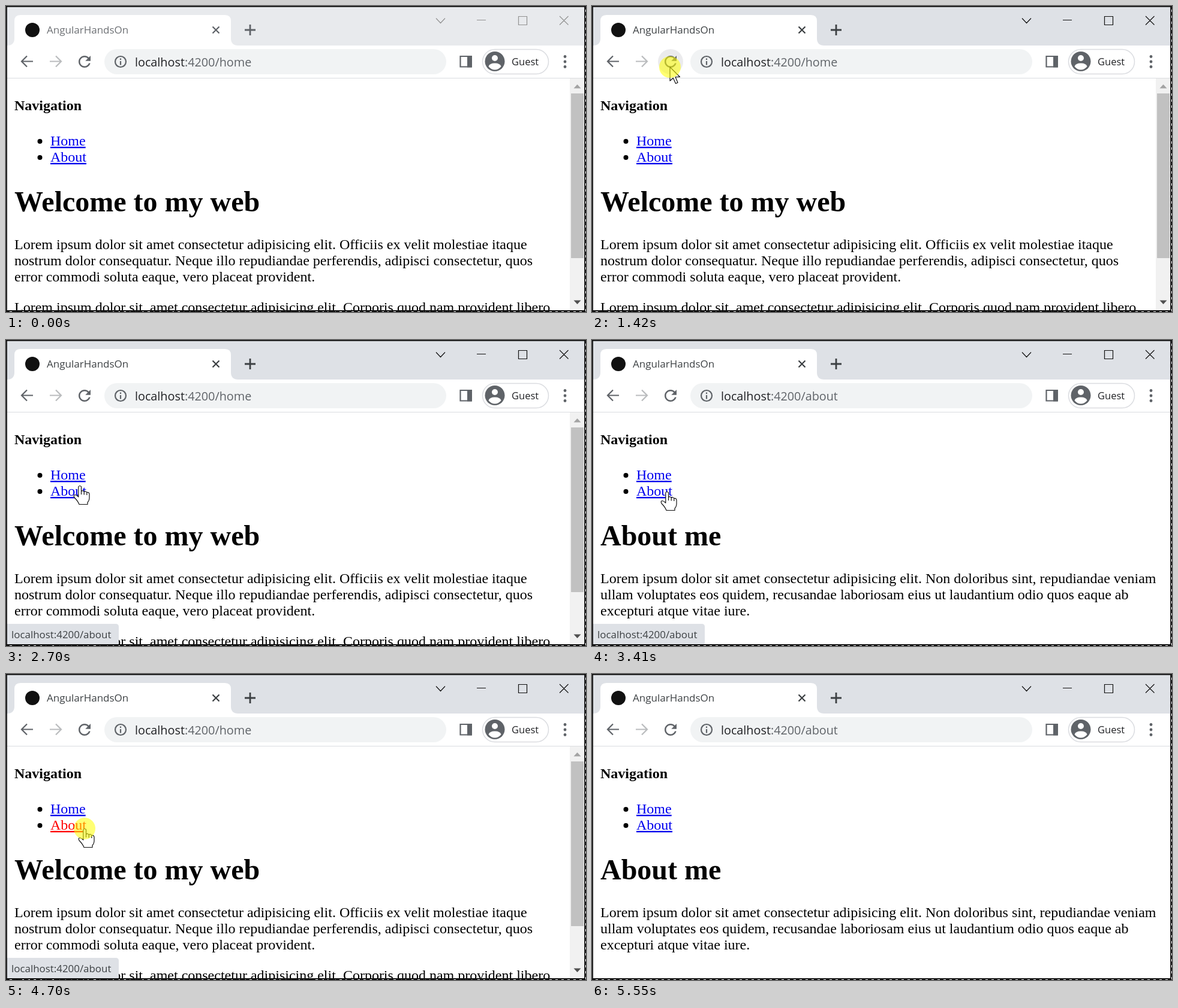
An HTML page for the animation above (5.84 s loop, 967 px wide and 511 px high).

```html
<!DOCTYPE html>
<html lang="en">
<head>
<meta charset="utf-8">
<title>Router navigation</title>
<style>
  html, body { margin: 0; width: 100%; height: 100%; overflow: hidden; background: #fff; }
  svg { display: block; width: 967px; height: 511px; }
  text { white-space: pre; }
  .ui { font-family: "Open Sans", "Noto Sans", sans-serif; fill: #3c4043; }
  .page { font: 24px "Liberation Serif", "Times New Roman", serif; fill: #000; }
  .bold { font-weight: bold; }
  .title { font-weight: bold; font-size: 48px; }
  .link { fill: #0000ee; text-decoration: underline; }
  .line { fill: none; stroke: #5f6368; stroke-width: 2.2; }
  .solid { fill: #5f6368; }
  #strip { fill: #dee1e6; }
  #controls { fill: none; stroke: #111; stroke-width: 1.2; }
  #tabMarks { fill: none; stroke: #3c4043; }
  .inactive #strip { fill: #e8eaed; }
  .inactive #controls { stroke: #929292; }
  .inactive #tabTitle { fill: #6c6f73; }
  .inactive #tabMarks { stroke: #5f6368; }
  #arrow, #hand { fill: #fff; stroke: #111; stroke-width: 1.2; stroke-linejoin: round; }
</style>
</head>
<body>
<svg id="stage" viewBox="0 0 967 511" class="inactive">
  <rect width="967" height="511" fill="#fff"/>

  <!-- tab strip -->
  <rect id="strip" width="967" height="66"/>
  <path d="M2 66Q14 66 14 54V25Q14 15 24 15H365Q375 15 375 25V54Q375 66 387 66Z" fill="#fff"/>
  <circle id="favicon" cx="44" cy="40" r="12" fill="#111"/>
  <text id="tabTitle" class="ui" x="68" y="46" font-size="17">AngularHandsOn</text>
  <g id="tabMarks">
    <path d="M344.5 34.5l11 11m0-11l-11 11" stroke-width="2.2"/>
    <path d="M398 40h18m-9-9v18" stroke-width="2.8"/>
  </g>
  <path id="controls" d="M717 20.5l7.500 8 7.500-8M785 23.500h15M854.500 17.500h14v14h-14zM923 17l14.500 14.500m0-14.500l-14.500 14.500"/>

  <!-- toolbar -->
  <path class="line" d="M45 92.500H26m9-9l-9 9 9 9"/>
  <path class="line" d="M73 92.500H92m-9-9l9 9-9 9" style="stroke:#babcbe"/>
  <circle id="hover" cx="131" cy="93" r="21" fill="#e9e9eb"/>
  <path class="solid" transform="translate(116 78) scale(1.25)" d="M17.650 6.350C16.200 4.900 14.210 4 12 4c-4.420 0-8 3.580-8 8s3.580 8 8 8c3.730 0 6.840-2.550 7.730-6h-2.080c-.82 2.330-3.040 4-5.650 4-3.310 0-6-2.690-6-6s2.690-6 6-6c1.660 0 3.140.69 4.220 1.780L13 11h7V4z"/>
  <rect x="164" y="72" width="570" height="42" rx="21" fill="#f1f3f4"/>
  <circle class="line" cx="191" cy="93" r="9"/>
  <path class="line" d="M191 92v6.500M191 87.500v2.500"/>
  <text class="ui" x="215" y="101" font-size="19.8" style="fill:#202124">localhost<tspan id="url" fill="#5f6368"></tspan></text>
  <path class="line" d="M757.500 84h18v17.500h-18z"/>
  <path class="solid" d="M769 83h8v19.500h-8z"/>
  <rect x="794.500" y="72.500" width="110" height="41" rx="20.500" fill="#fff" stroke="#dadce0" stroke-width="1.500"/>
  <circle class="solid" cx="815" cy="92.500" r="16.500"/>
  <circle cx="815" cy="87" r="5" fill="#fff"/>
  <path d="M804.500 101Q806 95.500 815 95.500T825.500 101Q821 106.500 815 106.500T804.500 101Z" fill="#fff"/>
  <text class="ui" x="843" y="98.500" font-size="16.5" style="fill:#202124">Guest</text>
  <g class="solid">
    <circle cx="932" cy="84.500" r="2.400"/><circle cx="932" cy="93" r="2.400"/><circle cx="932" cy="101.500" r="2.400"/>
  </g>
  <path d="M2 120.500H965" stroke="#dadce0"/>

  <!-- page -->
  <g class="page">
    <text class="bold" x="14" y="174">Navigation</text>
    <circle cx="56.500" cy="226" r="4"/>
    <circle cx="56.500" cy="253" r="4"/>
    <text id="homeLink" class="link" x="74" y="233">Home</text>
    <text id="aboutLink" class="link" x="74" y="260">About</text>
    <g id="homePage">
      <text class="title" x="14" y="343">Welcome to my web</text>
      <text x="14" y="406">Lorem ipsum dolor sit amet consectetur adipisicing elit. Officiis ex velit molestiae itaque</text>
      <text x="14" y="433">nostrum dolor consequatur. Neque illo repudiandae perferendis, adipisci consectetur, quos</text>
      <text x="14" y="460">error commodi soluta eaque, vero placeat provident.</text>
      <text x="14" y="511">Lorem ipsum dolor sit, amet consectetur adipisicing elit. Corporis quod nam provident libero</text>
      <path d="M940 121h24v388h-24z" fill="#f1f1f1"/>
      <path d="M942 146h21v275h-21z" fill="#c1c1c1"/>
      <path d="M946.500 137.500l6-6.500 6 6.500z" fill="#a3a3a3"/>
      <path d="M946.500 491.500l6 6.500 6-6.500z" fill="#505050"/>
    </g>
    <g id="aboutPage">
      <text class="title" x="14" y="343">About me</text>
      <text x="14" y="406">Lorem ipsum dolor sit amet consectetur adipisicing elit. Non doloribus sint, repudiandae veniam</text>
      <text x="14" y="433">ullam voluptates eos quidem, recusandae laboriosam eius ut laudantium odio quos eaque ab</text>
      <text x="14" y="460">excepturi atque vitae iure.</text>
    </g>
  </g>

  <g id="status">
    <path d="M1 474H183Q188 474 188 479V509H1Z" fill="#dee1e6"/>
    <text id="statusText" class="ui" x="9" y="498" font-size="16.9"></text>
  </g>

  <!-- window frame -->
  <path d="M0 .75H966M1 0V510M965 0V510M0 509H966" fill="none" stroke="#111" stroke-width="1.800"/>
  <path d="M966.500 0V511M0 510.500H967" fill="none" stroke="#111" stroke-dasharray="6 4"/>

  <g id="pointer">
    <path id="arrow" d="M0 0V23L5.300 18.200 9.500 27.500 13 26 9 16.500H16.500Z"/>
    <path id="hand" d="M-2.200 2Q0-1 2.500 2V9.500Q5.500 7.500 7.200 10.500 10 8.500 11.800 11.500 15.500 10.500 16 14.500V21Q15.500 26 13 28V31.500H-1Q-3 26-9 20-11 16-8 15.500-6 15.500-2.200 19ZM2.500 9.500V15M7.200 10.500V15.500M11.800 11.500V16"/>
    <circle id="press" r="18" fill="#ff0" fill-opacity=".55"/>
  </g>
</svg>

<script>
const LOOP = 5840;
const $ = id => document.getElementById(id);
const show = (id, on) => $(id).style.display = on ? "" : "none";

// Latest entry of a stepped track, each entry being [time, ...values].
const at = (track, t) => track.findLast(e => e[0] <= t).slice(1);
const within = (t, spans) => spans.some(([a, b]) => t >= a && t < b);

// Pointer: time, x, y, shape.
const approach = [300, 440, 590, 720, 870, 1010, 1150, 1300].map((t, i) => {
  const k = i / 7, e = k * k * (3 - 2 * k);
  return [t, 424 - 336 * e, 490 - 408 * e, "arrow"];
});
const pointer = [
  [0, 0, 0, ""], ...approach,
  [1420, 130, 102, "arrow"], [1710, 128, 132, "arrow"], [1850, 124, 186, "arrow"],
  [2000, 121, 230, "hand"], [2280, 120, 228, "hand"], [2420, 120, 227, "hand"],
  [2700, 123, 243, "hand"], [2850, 124, 249, "hand"], [3000, 125, 253, "hand"],
  [3690, 122, 244, "hand"], [3840, 120, 230, "hand"], [3990, 119, 222, "hand"],
  [4270, 121, 228, "hand"], [4410, 125, 242, "hand"], [4550, 129, 253, "hand"],
  [4700, 131, 258, "hand"], [4990, 152, 76, "arrow"], [5130, 0, 0, ""]
];
const route = [[0, "home"], [3410, "about"], [4120, "home"], [4840, "about"]];
const status = [
  [0, "", 0], [2000, "home", 1], [2700, "about", 1], [3840, "home", 1],
  [4410, "about", 1], [5410, "about", .5], [5550, "", 0]
];
const hover = [[0, 0], [1420, .9], [1850, .75], [2000, .6], [2130, 0]];
const presses = [[1420, 1570], [2570, 2700], [3280, 3410], [3990, 4120], [4700, 4840]];

function draw(t) {
  const [x, y, shape] = at(pointer, t);
  const [page] = at(route, t);
  const [target, alpha] = at(status, t);

  $("stage").classList.toggle("inactive", t < 1420);
  $("favicon").setAttribute("r", within(t, [[1850, 2130]]) ? 10.5 : 12);
  $("hover").style.opacity = at(hover, t)[0];
  $("url").textContent = ":4200/" + page;
  show("homePage", page === "home");
  show("aboutPage", page === "about");

  $("homeLink").style.fill = within(t, [[2570, 2700]]) ? "#f00" : "";
  $("aboutLink").style.fill = within(t, [[3280, 3410], [4700, 4840]]) ? "#f00" : "";
  $("statusText").textContent = "localhost:4200/" + target;
  $("status").style.opacity = alpha;

  $("pointer").setAttribute("transform", `translate(${x} ${y})`);
  show("arrow", shape === "arrow");
  show("hand", shape === "hand");
  show("press", within(t, presses));
}

const start = performance.now();
function tick() {
  draw((performance.now() - start) % LOOP);
  requestAnimationFrame(tick);
}
tick();
</script>
</body>
</html>
```
